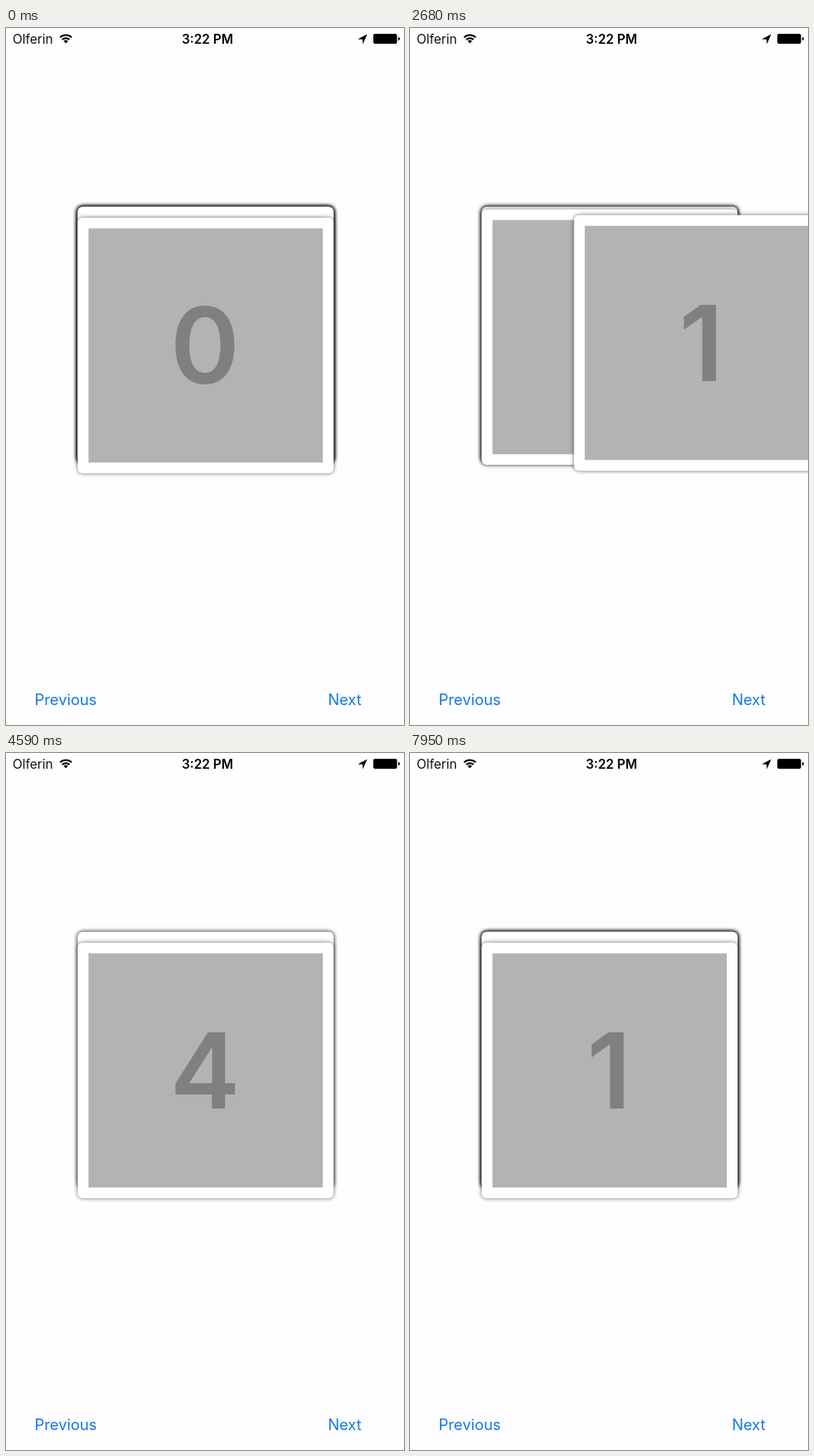
Recreate the animation shown at these times as an HTML page with a canvas. Size 480x841 px, loop 8 s.

```html
<!DOCTYPE html>
<html lang="en">
<head>
<meta charset="utf-8">
<title>Card stack</title>
<style>
  html, body { margin: 0; width: 100%; height: 100%; overflow: hidden; background: #fefdff; }
  canvas { display: block; width: 480px; height: 841px; }
</style>
</head>
<body>
<canvas id="stage"></canvas>
<script>
const W = 480, H = 841, LOOP = 8000;
const FONT = 'Inter, Roboto, sans-serif';
const CARD = { x: 86.5, y: 228.7, size: 308.6, border: 13, radius: 6 };
const COUNT = 7;    // cards in the stack
const LIFT = 13;    // how far waiting cards sit above the front one
const SLIDE = 420;  // duration of one swap, ms

// Each swap: start time and direction (1 = next, -1 = previous)
const swaps = [
  [1811, 1], [2541, 1], [3344, 1], [4169, 1],
  [5353, -1], [5993, -1], [6853, -1]
];

const canvas = document.getElementById('stage');
const ctx = canvas.getContext('2d');
const ratio = window.devicePixelRatio || 1;
canvas.width = W * ratio;
canvas.height = H * ratio;

// cubic-bezier(.42, 0, .58, 1)
function easeInOut(x) {
  if (x <= 0) return 0;
  if (x >= 1) return 1;
  let lo = 0, hi = 1;
  for (let i = 0; i < 24; i++) {
    const s = (lo + hi) / 2, r = 1 - s;
    const bx = 3 * r * r * s * 0.42 + 3 * r * s * s * 0.58 + s * s * s;
    if (bx < x) lo = s; else hi = s;
  }
  return lo * lo * (3 - 2 * lo);
}

function stackPosition(time) {
  return swaps.reduce((sum, [start, dir]) => sum + dir * easeInOut((time - start) / SLIDE), 0);
}

function text(str, x, y, size, weight, color, align) {
  ctx.font = `${weight} ${size}px ${FONT}`;
  ctx.textAlign = align;
  ctx.fillStyle = color;
  ctx.fillText(str, x, y);
}

function fillBox(x, y, w, h, r) {
  ctx.beginPath();
  ctx.roundRect(x, y, w, h, r);
  ctx.fill();
}

function polygon(points) {
  ctx.beginPath();
  points.forEach(([x, y]) => ctx.lineTo(x, y));
  ctx.closePath();
  ctx.fill();
}

function drawCard(index, position) {
  const offset = position - index;
  if (offset >= 1) return;
  const { size, border, radius } = CARD;
  const x = CARD.x + W * Math.max(offset, 0);
  const y = CARD.y - LIFT * Math.min(Math.abs(offset), 1);

  ctx.save();
  ctx.shadowColor = 'rgba(0, 0, 0, 0.6)';
  ctx.shadowBlur = 5.5 * ratio;
  ctx.fillStyle = '#fff';
  fillBox(x, y, size, size, radius);
  ctx.restore();

  ctx.fillStyle = '#b4b2b4';
  ctx.fillRect(x + border, y + border, size - 2 * border, size - 2 * border);
  text(String(index), x + size / 2 - 0.8, y + 200.6, 127, 600, '#807f81', 'center');
}

function drawWifi(x, y) {
  const a = Math.PI * 0.25;
  ctx.strokeStyle = ctx.fillStyle = '#000';
  ctx.lineWidth = 2;
  for (const r of [6.2, 9.9]) {
    ctx.beginPath();
    ctx.arc(x, y, r, -Math.PI + a, -a);
    ctx.stroke();
  }
  ctx.beginPath();
  ctx.moveTo(x, y);
  ctx.arc(x, y, 3.7, -Math.PI + a, -a);
  ctx.fill();
}

function drawBattery(x, y) {
  ctx.fillStyle = '#000';
  fillBox(x, y, 28.6, 12, 2);
  fillBox(x + 30, y + 4, 2, 4, [0, 2, 2, 0]);
}

function drawStatusBar() {
  text('Olferin', 8, 18.7, 15.4, 400, '#111', 'left');
  drawWifi(72.2, 18.4);
  text('3:22 PM', 243, 18.7, 15.4, 600, '#000', 'center');
  ctx.fillStyle = '#000';
  polygon([[435.6, 7.6], [424.2, 13.4], [430, 13.7], [430.4, 19.4]]);
  drawBattery(443, 7);
}

function draw(time) {
  ctx.setTransform(ratio, 0, 0, ratio, 0, 0);
  ctx.fillStyle = '#fefdff';
  ctx.fillRect(0, 0, W, H);
  drawStatusBar();
  const position = stackPosition(time);
  for (let i = COUNT - 1; i >= 0; i--) drawCard(i, position);
  text('Previous', 72, 817, 18.4, 400, '#1478e3', 'center');
  text('Next', 408.5, 817.3, 18.4, 400, '#1478e3', 'center');
}

const begin = performance.now();
function tick() {
  draw((performance.now() - begin) % LOOP);
  requestAnimationFrame(tick);
}
tick();
</script>
</body>
</html>
```
